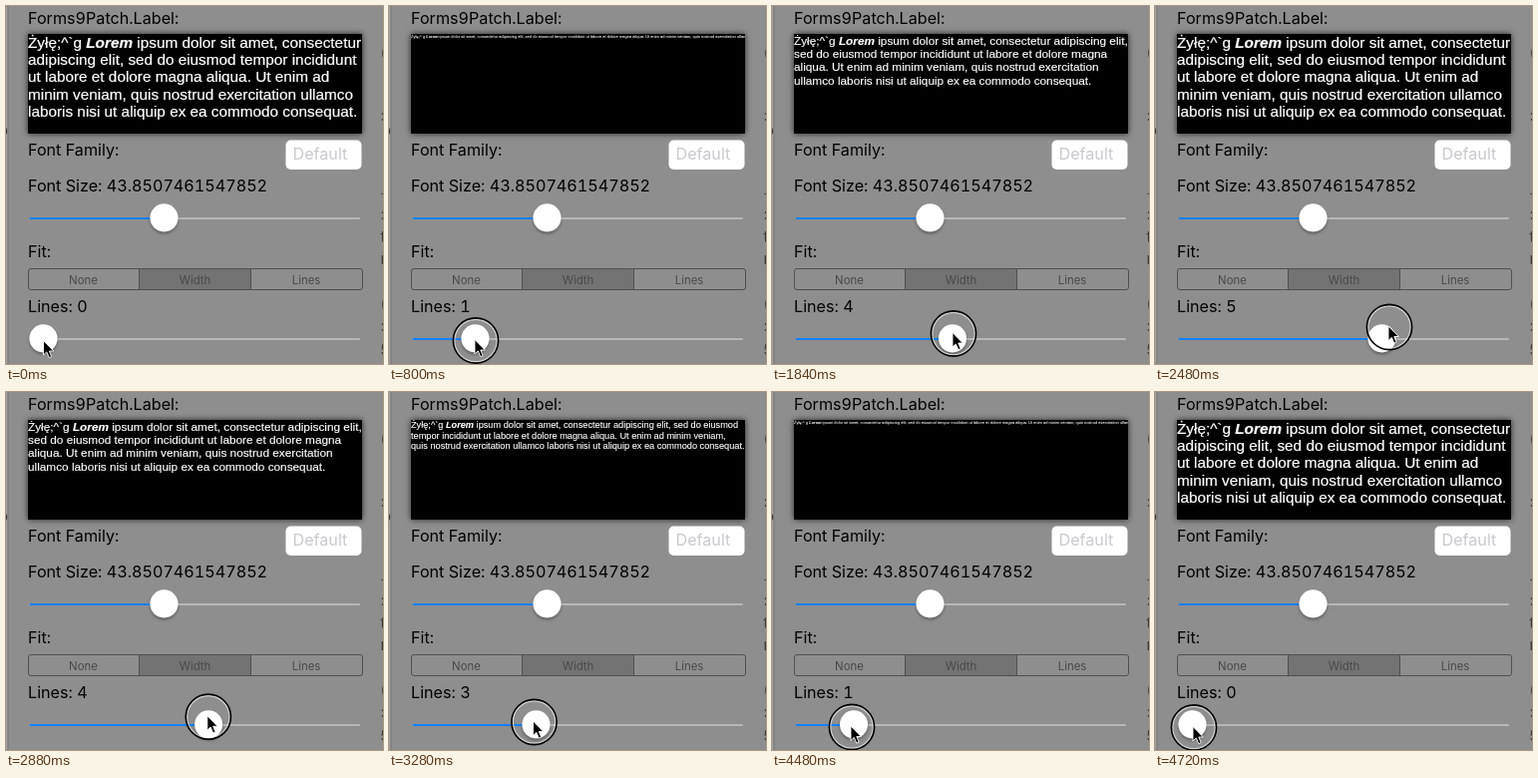
These frames come from a looping animation (378x359 px, 4.8 s). An HTML page:

```html
<!DOCTYPE html>
<html lang="en">
<head>
<meta charset="utf-8">
<title>Label fitting</title>
<style>
  html, body { margin: 0; width: 100%; height: 100%; overflow: hidden; background: #8e8e8e; }
  svg { display: block; width: 100%; height: 100%; }
  .ui { font: 16.15px Inter, sans-serif; font-variant-numeric: tabular-nums; }
  .tab { font: 11.4px Inter, sans-serif; fill: #494949; text-anchor: middle; }
  .edge { font: 15px Inter, sans-serif; fill: #3a3a3a; }
  #copy { font-family: "Liberation Sans", Arial, sans-serif; fill: #fff; stroke: #fff; stroke-width: .015em; }
  .strong { font-weight: bold; font-style: italic; }
</style>
</head>
<body>
<svg viewBox="0 0 378 359">
  <defs>
    <clipPath id="boxClip"><rect x="22" y="28" width="335" height="100"/></clipPath>
    <filter id="glow" x="-10%" y="-20%" width="120%" height="140%">
      <feDropShadow dx="0" dy="0" stdDeviation="3.2" flood-color="#000" flood-opacity=".75"/>
    </filter>
    <filter id="lift" x="-40%" y="-40%" width="180%" height="200%">
      <feDropShadow dx="0" dy="2" stdDeviation="1.8" flood-color="#000" flood-opacity=".35"/>
    </filter>
  </defs>
  <rect width="378" height="359" fill="#8e8e8e"/>

  <rect width="1.5" height="359" fill="#a3a3a3"/>
  <rect x="1.5" width="1" height="359" fill="#777"/>
  <text class="edge" x="-7" y="130">o</text>
  <g class="edge" id="edge"></g>

  <g class="ui">
    <text x="22" y="17.5">Forms9Patch.Label:</text>
    <text x="22" y="150">Font Family:</text>
    <text x="22" y="186">Font Size: 43.8507461547852</text>
    <text x="22" y="252">Fit:</text>
    <text id="count" x="22" y="307"></text>
    <rect x="280.5" y="134.5" width="76" height="29.5" rx="5" fill="#fff"/>
    <text x="287.5" y="154" fill="#c9c9ce">Default</text>
  </g>

  <rect x="22" y="28" width="335" height="100" filter="url(#glow)"/>
  <g clip-path="url(#boxClip)"><text id="copy"></text></g>

  <rect x="134" y="263.5" width="112" height="21" fill="#737373"/>
  <g fill="none" stroke="#4f4f4f">
    <rect x="22.5" y="263.5" width="335" height="21" rx="2.5"/>
    <path d="M133.5 263.5v21M245.5 263.5v21"/>
  </g>
  <g class="tab">
    <text x="77.5" y="278.5">None</text>
    <text x="189.5" y="278.5">Width</text>
    <text x="301" y="278.5">Lines</text>
  </g>

  <g id="sliders"></g>

  <g id="pointer">
    <g id="ring" fill="none">
      <circle r="21.2" stroke="#fff" stroke-opacity=".6" stroke-width="1.3"/>
      <circle r="22.6" stroke="#000" stroke-width="1.6"/>
    </g>
    <path d="M-1-1v14.5l3.3-3.1 2.5 5.8 2.4-1-2.4-5.7h4.5z" fill="#000" stroke="#fff" stroke-width=".9"/>
  </g>
</svg>
<script>
const LOOP = 4800, STEP = 80;
const SLIDER_START = 37, SLIDER_UNIT = 38;
const TRACK_LEFT = 23.5, TRACK_RIGHT = 355;
const el = id => document.getElementById(id);
const NS = "http://www.w3.org/2000/svg";

function add(parent, tag, attrs, text = "") {
  const node = document.createElementNS(NS, tag);
  for (const name in attrs) node.setAttribute(name, attrs[name]);
  node.textContent = text;
  parent.appendChild(node);
  return node;
}

const copy = "Żyłę;^`g Lorem ipsum dolor sit amet, consectetur adipiscing elit, sed do eiusmod tempor incididunt " +
  "ut labore et dolore magna aliqua. Ut enim ad minim veniam, quis nostrud exercitation ullamco " +
  "laboris nisi ut aliquip ex ea commodo consequat.";

// Font size and the words that open each new line, by line count
const layouts = {
  1: [4, []],
  2: [6.06, ["aliqua."]],
  3: [9.2, ["tempor", "quis"]],
  4: [11.8, ["sed", "aliqua.", "ullamco"]],
  5: [15.32, ["adipiscing", "ut labore", "minim", "laboris"]]
};

function layCopy(count) {
  const [size, breaks] = layouts[count] || layouts[5];
  const marks = [0, ...breaks.map(word => copy.indexOf(word)), copy.length];
  const label = el("copy");
  label.textContent = "";
  label.setAttribute("font-size", size);
  for (let i = 0; i < marks.length - 1; i++) {
    const line = copy.slice(marks[i], marks[i + 1]).trim();
    const at = { x: 22, y: 28 + size * (0.91 + 1.124 * i) };
    const [before, after] = line.split("Lorem");
    add(label, "tspan", at, before);
    if (after !== undefined) {
      add(label, "tspan", { class: "strong" }, "Lorem");
      add(label, "tspan", {}, after);
    }
  }
}

function makeSlider(y) {
  const group = el("sliders");
  const bar = { x: TRACK_LEFT, y: y - 1, height: 2, rx: 1 };
  add(group, "rect", { ...bar, width: TRACK_RIGHT - TRACK_LEFT, fill: "#b8b8b8" });
  const fill = add(group, "rect", { ...bar, fill: "#1680f5" });
  const knob = add(group, "circle", { cy: y - 0.7, r: 14, fill: "#fff", filter: "url(#lift)" });
  return x => {
    fill.setAttribute("width", x - TRACK_LEFT);
    knob.setAttribute("cx", x);
  };
}

makeSlider(213)(158.5);
const setLines = makeSlider(334);

[["(", 52], [":", 115], ["-", 193], [":", 214], ["t", 237], ["r", 259], ["(", 304], [":", 326], ["5", 350]]
  .forEach(([glyph, y]) => add(el("edge"), "text", { x: 375.5, y }, glyph));

// time, pointer x, pointer y, knob x
const path = [
  [0, 38.5, 336.5, 37.5], [80, 39, 336.5, 37.5], [160, 45, 336, 43], [240, 60, 336, 58],
  [320, 76, 336, 74], [400, 83, 336, 83], [720, 83, 336, 83], [800, 87, 335.5, 86.5],
  [1840, 182, 328.5, 181], [2480, 235, 322, 227.5], [2600, 243, 322, 242],
  [3280, 145.5, 331, 147.5], [3920, 98, 334, 102.5], [4080, 91, 335.5, 91],
  [4400, 91, 335.5, 91], [4480, 80, 336, 82], [4560, 60, 336, 62],
  [4640, 44, 336.5, 45], [4720, 39, 336.5, 37.5], [4800, 39, 336.5, 37.5]
];

function poseAt(t) {
  const i = path.findIndex(key => key[0] > t);
  const a = path[i - 1], b = path[i];
  const k = (t - a[0]) / (b[0] - a[0]);
  return a.map((v, j) => v + (b[j] - v) * k);
}

let shown = -1;
function draw(now) {
  const t = Math.floor((now % LOOP) / STEP) * STEP;
  const [, x, y, knob] = poseAt(t);
  const count = Math.round((knob - SLIDER_START) / SLIDER_UNIT);
  if (count !== shown) {
    shown = count;
    el("count").textContent = "Lines: " + count;
    layCopy(count);
  }
  setLines(knob);
  el("pointer").setAttribute("transform", `translate(${x} ${y})`);
  el("ring").setAttribute("visibility", t < STEP ? "hidden" : "visible");
}

const start = performance.now();
function tick() {
  draw(performance.now() - start);
  requestAnimationFrame(tick);
}
tick();
</script>
</body>
</html>
```
